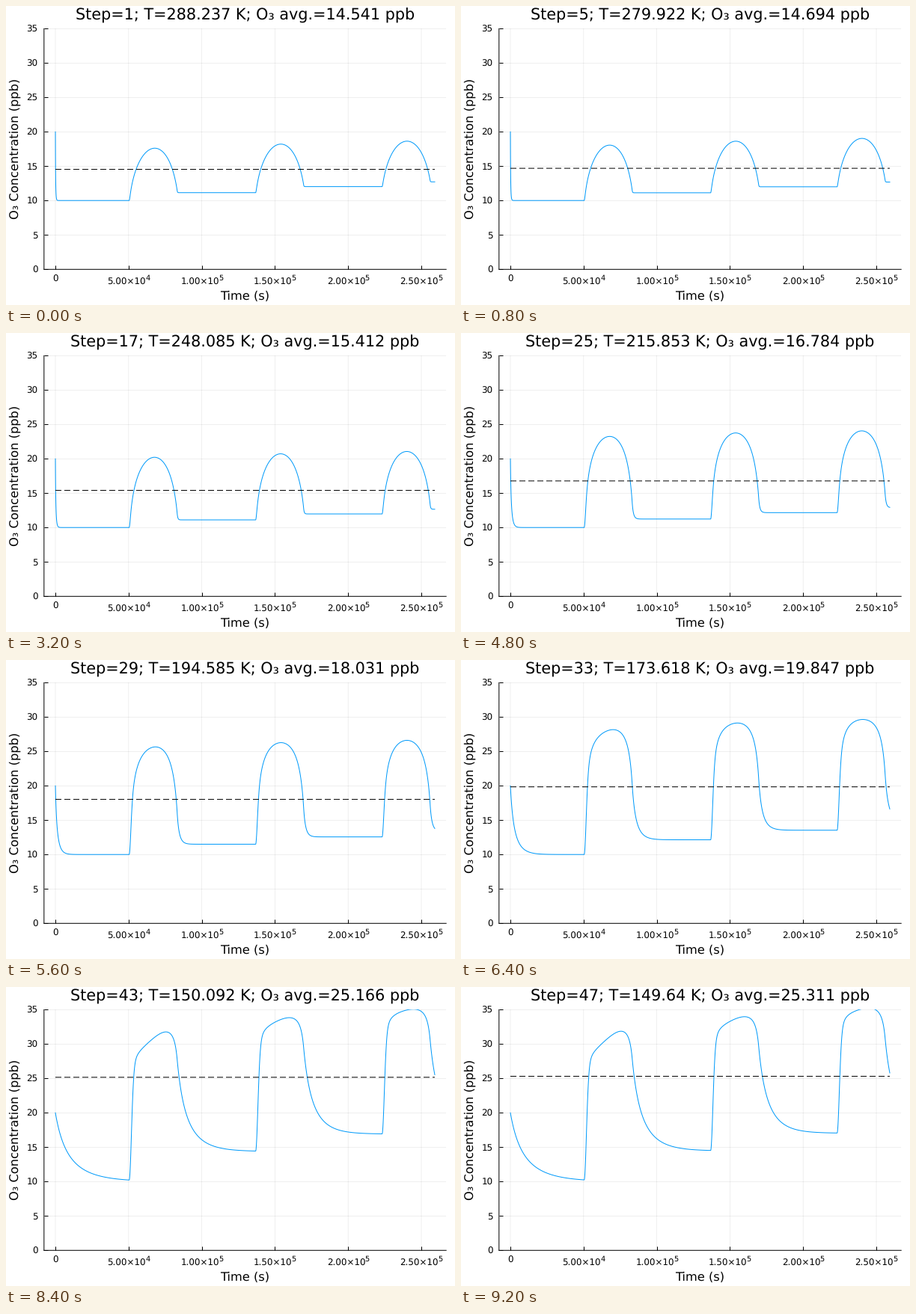
Animation, 600 px wide and 400 px high, one loop 9.4 s. Source, as a matplotlib script:

```python
import numpy as np
import matplotlib.pyplot as plt
from matplotlib.animation import FuncAnimation

W, H, DPI = 600, 400, 100
PX = 72 / DPI                      # points per pixel
LEFT, RIGHT, TOP, BOTTOM = 50.8, 588.2, 30.3, 352.3
STEPS, INTERVAL = 47, 200

DAY, SPAN, DT = 86400, 259200, 60
SUNRISE, DAYLIGHT = 50400, 32800
J_MAX = 3.87e-3                    # peak photolysis rate, 1/s
NOX = 19.9                         # ppb at the start
T_REF, K_REF, T_ACT = 149.64, 6.1e-6, 1500

# step, temperature in K, mean ozone in ppb
KEYS = np.array([
    (1, 288.237, 14.541), (10, 268.782, 14.911), (17, 248.085, 15.412),
    (25, 215.853, 16.784), (33, 173.618, 19.847), (39, 150.815, 24.948),
    (47, 149.64, 25.311)])


def smooth(x, xs, ys):
    """Monotone cubic through the points (xs, ys)."""
    d = np.diff(ys) / np.diff(xs)
    inner = 2 * d[:-1] * d[1:] / (d[:-1] + d[1:])
    slopes = np.concatenate([d[:1], inner, d[-1:]])
    i = np.clip(np.searchsorted(xs, x, side="right") - 1, 0, len(xs) - 2)
    h = xs[i + 1] - xs[i]
    u = (x - xs[i]) / h
    return (ys[i] * (1 + 2 * u) * (1 - u) ** 2
            + ys[i + 1] * u * u * (3 - 2 * u)
            + h * slopes[i] * u * (1 - u) ** 2
            - h * slopes[i + 1] * u * u * (1 - u))


key_step, key_temp, key_mean = KEYS.T
temps = smooth(np.arange(1, STEPS + 1), key_step, key_temp)
means = smooth(temps, key_temp[::-1], key_mean[::-1])

# Cold air reacts slowly and keeps more of the ozone made each day.
rate = K_REF * np.exp(T_ACT * (1 / T_REF - 1 / temps)) * T_REF / temps
cold = rate[-1] / rate
first = 0.75 + 3.7 * cold ** 0.8 + 0.004 / cold
gains = first, 0.3 + 0.51 * first, 0.31 + 0.335 * first


def sunlight(t):
    f = (t % DAY - SUNRISE) / DAYLIGHT
    return J_MAX * np.sin(np.pi * f) if 0 < f < 1 else 0.0


def passed(t, day):
    """Share of one day's light that has fallen by time t."""
    f = np.clip((t - day * DAY - SUNRISE) / DAYLIGHT, 0, 1)
    return (1 - np.cos(np.pi * f)) / 2


def conditions(t):
    """Light, total NOx and ozone surplus at time t."""
    shares = [passed(t, day) for day in range(3)]
    surplus = 10.01 + sum(g * s for g, s in zip(gains, shares))
    return sunlight(t), NOX - 0.73 * sum(shares), surplus


def slope(no, light, nox, surplus):
    return light * (nox - no) - rate * (surplus + no) * no


def solve():
    """Ozone over time for every temperature, by Runge-Kutta on NO."""
    times = np.arange(0, SPAN + DT, DT)
    no = np.full(STEPS, 9.99)
    now = conditions(0)
    ozone = [now[2] + no]
    for t in times[:-1]:
        mid, end = conditions(t + DT / 2), conditions(t + DT)
        a = slope(no, *now)
        b = slope(no + a * DT / 2, *mid)
        c = slope(no + b * DT / 2, *mid)
        d = slope(no + c * DT, *end)
        no = no + DT / 6 * (a + 2 * b + 2 * c + d)
        now = end
        ozone.append(now[2] + no)
    return times, np.array(ozone)


times, ozone = solve()

plt.rcParams.update({"font.family": "DejaVu Sans", "text.hinting": "none",
                     "path.simplify": False})
fig = plt.figure(figsize=(W / DPI, H / DPI), dpi=DPI, facecolor="white")
ax = fig.add_axes([LEFT / W, 1 - BOTTOM / H,
                   (RIGHT - LEFT) / W, (BOTTOM - TOP) / H])
ax.set_xlim(-0.03 * SPAN, 1.03 * SPAN)
ax.set_ylim(0, 35)
ax.set_xticks(np.arange(0, 250001, 50000))
ax.set_yticks(np.arange(0, 36, 5))
ax.tick_params(direction="in", length=5 * PX, width=PX,
               labelleft=False, labelbottom=False)
ax.grid(color="black", alpha=0.1, linewidth=0.6 * PX, snap=False)
ax.set_axisbelow(True)
ax.spines[["top", "right"]].set_visible(False)
for side in ("left", "bottom"):
    ax.spines[side].set(linewidth=PX, snap=False)


def label(x, y, text, size, ha="center", **kw):
    return fig.text(x / W, 1 - y / H, text, fontsize=size * PX,
                    ha=ha, va="baseline", **kw)


TICK, GUIDE, HEAD = 11.86, 16.3, 20.75
for v in range(0, 36, 5):
    y = BOTTOM - v / 35 * (BOTTOM - TOP)
    label(42.5, y + 4.5, str(v), TICK, ha="right")

x_unit = (RIGHT - LEFT) / 1.06 / SPAN
x_zero = LEFT + 0.03 * SPAN * x_unit
label(x_zero, 369, "0", TICK)
for v in range(50000, 250001, 50000):
    power = int(np.log10(v))
    x = x_zero + v * x_unit - 28.4
    label(x, 373, f"{v / 10 ** power:.2f}×10", TICK, ha="left")
    label(x + 50.7, 367, str(power), TICK * 0.82, ha="left")

label(319.5, 393, "Time (s)", GUIDE)
label(16.5, 190.9, "O₃ Concentration (ppb)", GUIDE, rotation=90,
      rotation_mode="anchor")
title = label(319.4, 19, "", HEAD)

curve, = ax.plot([], [], color="#009AFA", linewidth=PX)
mean_line, = ax.plot([], [], color="black", linewidth=PX, snap=False,
                     dashes=(8, 4), dash_capstyle="butt")


def draw(i):
    temp, mean = round(float(temps[i]), 3), round(float(means[i]), 3)
    title.set_text(f"Step={i + 1}; T={temp} K; O₃ avg.={mean} ppb")
    curve.set_data(times, ozone[:, i])
    mean_line.set_data([0, SPAN], [mean, mean])
    return curve, mean_line, title


anim = FuncAnimation(fig, draw, frames=STEPS, interval=INTERVAL,
                     repeat=True, repeat_delay=0)
plt.show()
```
